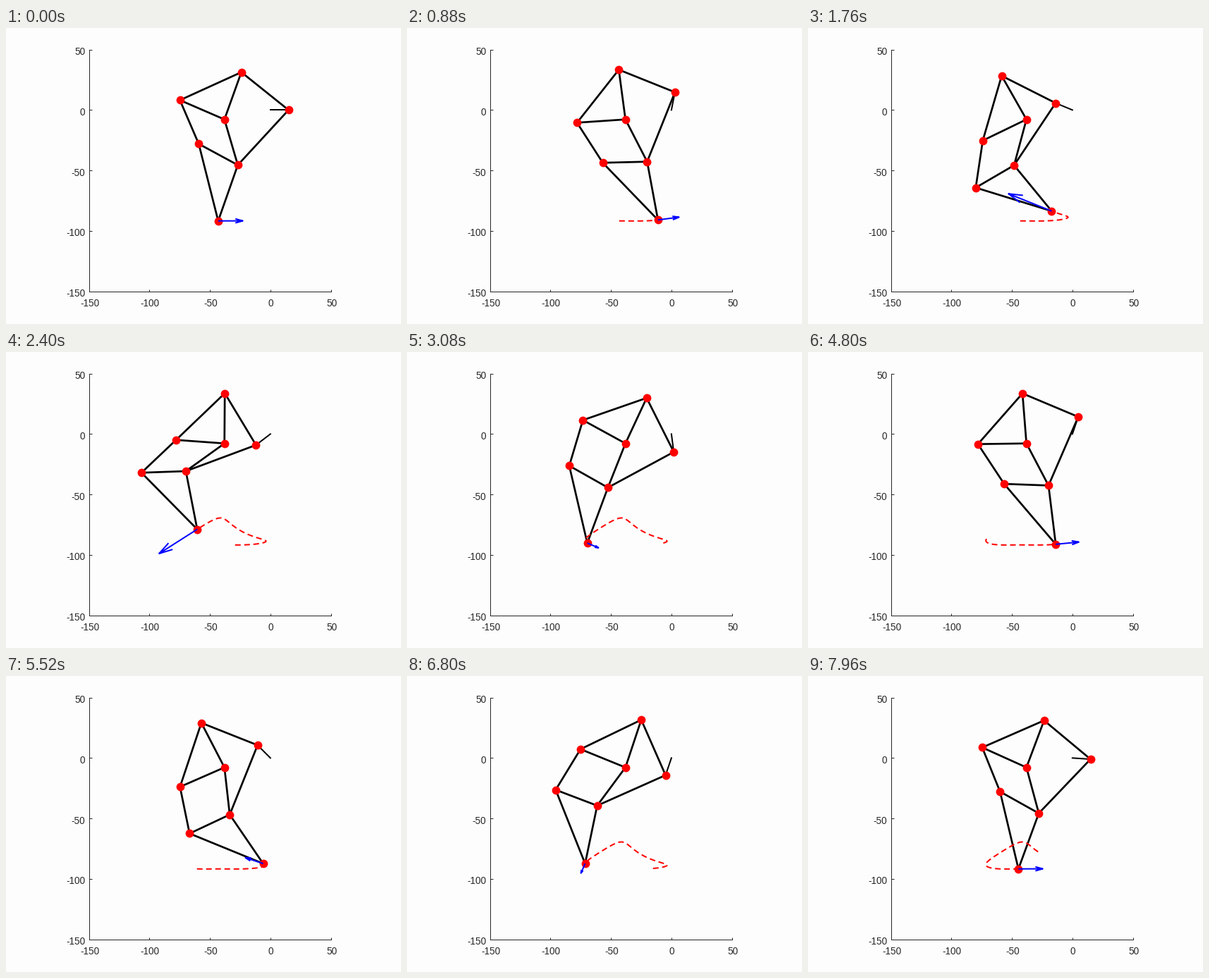
These frames come from a looping animation (560 px wide and 420 px high, 8000 ms). A matplotlib script:

```python
import numpy as np
import matplotlib.pyplot as plt
from matplotlib.animation import FuncAnimation
from matplotlib.transforms import ScaledTranslation

W, H = 560, 420
PX = 0.72                     # points per pixel at 100 dpi
FRAMES, INTERVAL = 200, 40
RATE = 24                     # crank steps per second
CYCLE, TRAIL = 96, 49         # steps per turn, steps kept in the trail
LEFT, BASE, SIDE = 117.6, 373.6, 343
BG, INK = "#fdfdfd", "#262626"

PIVOT = -38 - 7.8j
CRANK = 15


def meet(p, q, rp, rq):
    """Point at distance rp from p and rq from q, left of the way p to q."""
    d = abs(q - p)
    a = (rp**2 - rq**2 + d**2) / (2 * d)
    return p + (q - p) / d * (a + 1j * np.sqrt(rp**2 - a**2))


def linkage(theta):
    """Joints of the walking leg as complex numbers."""
    crank = CRANK * np.exp(1j * theta)
    top = meet(PIVOT, crank, 41.5, 50)
    left = meet(PIVOT, top, 40.1, 55.8)
    low = meet(crank, PIVOT, 61.9, 39.3)
    knee = meet(low, left, 36.7, 39.4)
    foot = meet(low, knee, 49, 65.7)
    return crank, top, left, low, knee, foot


def foot_at(theta):
    return linkage(theta)[-1]


def xy(points):
    z = np.asarray(points, dtype=complex)
    return z.real, z.imag


plt.rcParams["font.family"] = "Liberation Sans"
plt.rcParams["axes.unicode_minus"] = False

fig = plt.figure(figsize=(W / 100, H / 100), dpi=100, facecolor=BG)
ax = fig.add_axes([LEFT / W, (H - BASE) / H, SIDE / W, SIDE / H], facecolor=BG)
ax.set_xlim(-150, 50)
ax.set_ylim(-150, 50)
ax.set_xticks(range(-150, 51, 50))
ax.set_yticks(range(-150, 51, 50))
for side in ("top", "right"):
    ax.spines[side].set_visible(False)
for side in ("left", "bottom"):
    ax.spines[side].set_color(INK)
    ax.spines[side].set_linewidth(PX)
ax.tick_params(direction="in", length=3.5 * PX, width=PX, color=INK,
               labelcolor=INK, labelsize=13.5 * PX)
ax.tick_params(axis="x", pad=10.5 * PX)
ax.tick_params(axis="y", pad=5.5 * PX)


def nudge(labels, dx, dy):
    shift = ScaledTranslation(dx / 100, dy / 100, fig.dpi_scale_trans)
    for label in labels:
        label.set_transform(label.get_transform() + shift)


nudge(ax.get_xticklabels(), 0.9, 0)
nudge(ax.get_yticklabels(), 0, -2)


def line(color, width, z, **kw):
    return ax.plot([], [], color=color, lw=width * PX, zorder=z, **kw)[0]


crank_line = line("black", 2, 3)
links = line("black", 2.7, 3, solid_joinstyle="round")
dots = line("red", 0, 4, marker="o", ms=11.8 * PX, mew=0)
trail = line("red", 2, 5, dashes=(4, 2.5), dash_capstyle="butt")
arrow = line("blue", 2, 6, solid_joinstyle="round", solid_capstyle="butt")

step = 2 * np.pi / CYCLE
path = foot_at(step * np.arange(FRAMES))


def draw(i):
    k = round(i * INTERVAL * RATE / 1000)
    theta = k * step
    crank, top, left, low, knee, foot = linkage(theta)
    gap = complex(np.nan, np.nan)

    crank_line.set_data(*xy([0, crank]))
    links.set_data(*xy([low, crank, top, left, PIVOT, top, gap,
                        PIVOT, low, knee, left, gap, knee, foot, low]))
    dots.set_data(*xy([crank, top, left, PIVOT, low, knee, foot]))
    trail.set_data(*xy(path[max(0, k - TRAIL):k + 1]))

    eps = 1e-4
    speed = (foot_at(theta + eps) - foot_at(theta - eps)) / (2 * eps)
    v = 0.9 * speed
    tip = foot + v
    arrow.set_data(*xy([foot, tip, gap,
                        tip - v * (0.3 + 0.084j), tip, tip - v * (0.3 - 0.084j)]))
    return crank_line, links, dots, trail, arrow


anim = FuncAnimation(fig, draw, frames=FRAMES, interval=INTERVAL, repeat=True,
                     repeat_delay=0, blit=False)
plt.show()
```
